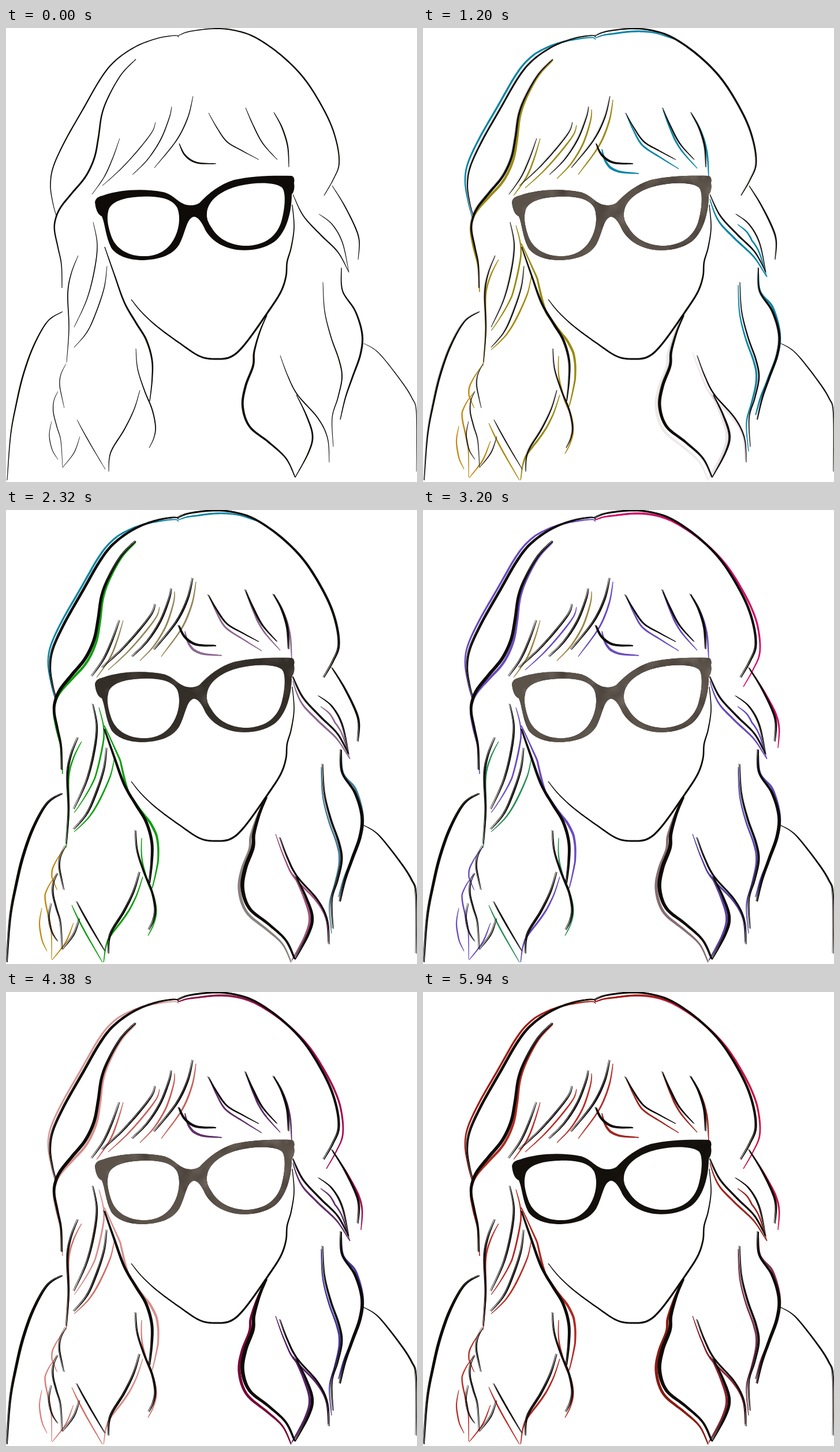
Animation, 712 px wide and 786 px high, one loop 6000 ms. Source, as an HTML page with a canvas:

```html
<!DOCTYPE html>
<html lang="en">
<head>
<meta charset="utf-8">
<title>Line portrait</title>
<style>
  html, body { margin: 0; width: 100%; height: 100%; overflow: hidden; background: #fff; }
  canvas { display: block; }
</style>
</head>
<body>
<canvas id="stage" width="712" height="786"></canvas>
<script>
const ctx = document.getElementById('stage').getContext('2d');
const LOOP = 6000, INK = '#0e0b08';

// Echo colour of each group from a given state on; none before the first.
const echoes = {
  side:   { 1: '0a86a8', 6: '6a4bc0', 8: 'd99a98', 10: '4a3a90', 12: 'a41c12' },
  crown:  { 1: '0a86a8', 6: 'd01068', 8: '8c1a48', 10: '5a3a90', 12: 'a41c12' },
  lock:   { 2: '9a8a10', 4: '10a010', 6: '6a4bc0', 8: 'd8908c', 10: '6a4a90', 12: 'b02a22' },
  wisp:   { 2: 'a88a12', 4: '10a010', 6: '2c9058', 8: 'd07068', 10: '7a5a98', 12: 'b83028' },
  fringe: { 2: '9a8a18', 4: '948458', 6: '6a4bc0', 8: 'c8605a', 10: '74589a', 12: 'b83028' },
  bang:   { 2: '9a8a18', 4: '948458', 6: '9c8440', 8: 'c8605a', 10: '74589a', 12: 'b83028' },
  part:   { 1: '0a86a8', 4: '8c6890', 6: '6a4bc0', 8: '60306a', 10: '44389a', 12: 'a02820' },
  long:   { 1: '0a86a8', 4: '4a7c98', 6: '5c4cb8', 8: '4838a0', 10: '4034a0', 12: '803050' },
  outer:  { 6: 'd01068', 8: 'a80c50', 10: 'c0187a', 12: 'cc1444' },
  curl:   { 3: '8a8280', 7: '780838', 10: '3c2c84', 12: '8a1c12' },
  tail:   { 3: 'a0507c', 6: '5a48b0', 7: '58206a', 10: '40349a', 12: '8a2030' },
  tip:    { 2: 'c08a14', 6: '6a4bc0', 8: 'd8807a', 10: '9a6a98', 12: 'b83028' }
};
const weights = { 0: 1, 2: 1.3, 3: 1.5 };
const doubles = { 0: 0, 3: 1 };
const browns = { 0: 0, 1: 1, 4: 0, 5: 1, 12: 0.07 };

// group, ink width, points, echo offsets spread along the line
const strokes = [
  ['outer', 2.6, '297,14 318,6 363,1 400,5 435,18 480,50 520,92 555,150 572,195 577,235 567,262 551,290',
    '0,3 1,6 1,4 5,5 6,4 8,6 6,12 4,16'],
  ['crown', 0, '297,14 318,6 363,1 400,5 440,20', '2,3 0,6 0,4 -2,0'],
  ['side', 2.2, '299,16 293,13 262,18 225,32 190,56 165,86 132,143 102,196 82,240 77,272 81,302 87,325',
    '0,4 -2,3 -6,-3 -5,-3 -5,-4 -4,-6 -2,2'],
  ['lock', 3, '225,54 200,80 178,118 166,150 160,190 153,225 138,257 115,285 95,310 86,330 84,350 90,380 96,410 97,450',
    '0,2 2,2 3,4 3,5 0,2 -2,3 1,7'],
  ['lock', 3.2, '171,379 187,425 205,475 225,510 243,540 253,575 253,610 249,646',
    '-1,-6 8,0 2,5 6,5 10,0 10,5 4,9'],
  ['lock', 1.7, '151,336 158,375 153,420 140,470 118,518', '10,6 12,5 9,10 0,6'],
  ['wisp', 1.7, '175,412 170,450 155,495 140,527 118,553', '13,18 10,8 5,5 0,4'],
  ['wisp', 1.8, '125,394 113,425 107,460 109,520 105,579', '6,7 3,4 0,2 -1,6'],
  ['tip', 1.3, '104,581 95,600 93,618 97,640 101,658', '0,2 -10,8 -16,3 -12,0'],
  ['tip', 1.4, '90,629 83,645 82,665 88,690 95,715 98,761', '0,0 -14,8 -15,12 -19,17'],
  ['tip', 1.2, '79,681 75,705 80,730 90,747', '-17,8 -17,13 -19,17'],
  ['tip', 1.2, '128,707 118,735 98,761', '-11,8 -18,18'],
  ['wisp', 1.4, '123,678 133,697 150,727 172,764', '-9,6 -8,12 -5,19'],
  ['lock', 2, '232,627 222,660 205,695 185,727 179,745 178,768', '5,8 3,8 -4,8 -9,15'],
  ['wisp', 2, '225,555 228,590 240,628 253,660 259,690 256,710 248,727', '10,13 5,15 1,5 -2,10'],
  ['fringe', 1.8, '324,118 315,155 295,195 257,242', '5,6 8,9 12,12'],
  ['bang', 1.7, '287,136 283,155 268,193 245,228 219,254', '5,5 9,8 13,7'],
  ['fringe', 1.5, '259,163 253,180 230,210 200,243 167,273', '7,5 8,5 10,4'],
  ['bang', 1.5, '197,191 185,225 170,258 149,288', '6,0 8,2 8,2'],
  ['part', 1.8, '351,147 365,172 383,197 410,213 438,228', '2,4 -3,6 5,16'],
  ['part', 1.8, '415,138 428,168 445,200 470,228', '1,4 0,8 5,15'],
  ['part', 2.3, '464,146 478,172 488,205 490,241', '2,4 3,6 5,16'],
  ['part', 3, '300,200 310,220 330,233 364,235', '10,10 6,14 10,17'],
  ['outer', 2.1, '565,273 585,305 605,345 612,370 610,401', '2,5 5,5 5,11'],
  ['part', 2.2, '497,288 515,325 545,358 575,388 594,423', '0,8 -6,6 -5,6 2,8'],
  ['part', 1.6, '542,322 565,340 583,372 594,423', '3,18 -5,14 2,8'],
  ['long', 3.2, '581,415 583,455 605,490 617,530 614,565 600,605 588,640 579,678', '0,8 3,-3 0,2 -3,4 -3,-8'],
  ['long', 2, '549,440 552,490 563,535 577,575 582,605 575,640 565,675 567,725', '-3,5 -4,3 -4,2 -6,10 -3,8'],
  ['curl', 4, '452,497 440,525 430,560 428,585 415,620 410,655 422,690 455,717 485,745 501,778',
    '-2,3 -6,3 -6,2 -5,8 -7,5'],
  ['tail', 1.9, '475,567 488,602 505,635 540,675 557,710 560,752', '-8,-6 -5,3 -3,0 -2,-4'],
  ['tail', 2.8, '503,635 520,670 531,705 524,735 501,778', '-5,-4 -5,0 -6,2'],
  ['body', 2.6, '98,491 72,508 48,550 30,600 18,650 8,705 2,783'],
  ['body', 1.6, '620,546 645,562 680,605 703,640 711,668 711,768'],
  ['face', 3.2, '217,470 235,492 262,517 300,545 335,568 362,573 390,569 415,546 455,490 476,457 485,430 487,405 494,380 499,345 496,306']
].map(([group, width, line, shift]) => {
  const points = spline(pairs(line));
  return { group, width, points, echo: shift && shifted(points, pairs(shift)) };
});

const glasses = new Path2D(
  'M154,301Q156,292 168,290C200,279 240,278 272,284C290,288 297,302 312,306Q325,309 335,303' +
  'C352,285 370,271 395,263C425,256 465,255 495,256Q501,258 499,268Q501,282 495,288' +
  'C495,320 485,355 465,370C445,384 420,386 400,384C370,380 350,362 343,345Q333,325 324,327' +
  'C312,332 311,355 300,375C288,395 262,401 238,402C210,402 190,393 182,380C172,360 172,340 166,326Q156,322 154,301Z' +
  'M177,318C180,300 205,293 235,292C262,291 288,294 297,312C303,328 300,350 290,367' +
  'C278,388 258,396 236,395C208,394 190,380 183,362C177,345 174,330 177,318Z' +
  'M348,320C350,297 375,280 405,273C430,267 465,266 478,276C486,285 483,315 477,335' +
  'C470,358 452,375 420,377C390,378 368,365 357,347Q346,332 348,320Z');

let seed = 7;
const random = () => (seed = seed * 16807 % 2147483647) / 2147483647;
const blots = Array.from({ length: 130 }, () => {
  const x = 150 + random() * 352, y = 250 + random() * 155, r = 5 + random() * 14;
  const fill = ctx.createRadialGradient(x, y, 0, x, y, r);
  const tone = random() < 0.5 ? '128,118,110' : '50,43,38';
  fill.addColorStop(0, `rgba(${tone},.35)`);
  fill.addColorStop(1, `rgba(${tone},0)`);
  return { x, y, r, fill };
});

function pairs(text) {
  return text.split(' ').map(p => p.split(',').map(Number));
}

// Catmull-Rom curve through the points
function spline(p) {
  const out = [], n = p.length - 1;
  for (let i = 0; i < n; i++) {
    const a = p[Math.max(i - 1, 0)], b = p[i], c = p[i + 1], d = p[Math.min(i + 2, n)];
    for (let s = 0; s < 10; s++) {
      const u = s / 10;
      out.push([0, 1].map(k => b[k] + u / 2 * (c[k] - a[k] +
        u * (2 * a[k] - 5 * b[k] + 4 * c[k] - d[k] + u * (3 * (b[k] - c[k]) + d[k] - a[k])))));
    }
  }
  return [...out, p[n]];
}

function shifted(points, offsets) {
  return points.map((p, i) => {
    const f = i / (points.length - 1) * (offsets.length - 1);
    const j = Math.min(Math.floor(f), offsets.length - 2);
    return p.map((v, k) => v + offsets[j][k] + (f - j) * (offsets[j + 1][k] - offsets[j][k]));
  });
}

// Fill a line that thins out at both ends.
function brush(points, width, color, dx = 0, dy = 0) {
  const left = [], right = [], n = points.length - 1;
  points.forEach(([x, y], i) => {
    const a = points[Math.max(i - 1, 0)], b = points[Math.min(i + 1, n)];
    const tx = b[0] - a[0], ty = b[1] - a[1];
    const h = width * (0.4 + 0.6 * Math.sin(Math.PI * i / n)) / 2 / (Math.hypot(tx, ty) || 1);
    left.push([x + dx - ty * h, y + dy + tx * h]);
    right.unshift([x + dx + ty * h, y + dy - tx * h]);
  });
  ctx.beginPath();
  [...left, ...right].forEach(p => ctx.lineTo(...p));
  ctx.fillStyle = color;
  ctx.fill();
}

function held(keys, state) {
  while (state >= 0 && !(state in keys)) state--;
  return keys[state];
}

function blend(keys, state, p) {
  const a = held(keys, state), b = held(keys, state + 1);
  return a + (b - a) * p;
}

function blendColor(keys, state, p) {
  const a = held(keys, state), b = held(keys, state + 1);
  if (!b) return null;
  const rgb = hex => [0, 2, 4].map(i => parseInt(hex.slice(i, i + 2), 16));
  const from = rgb(a || b), to = rgb(b);
  return `rgba(${from.map((v, i) => Math.round(v + (to[i] - v) * p))},${a ? 1 : p})`;
}

function draw(t) {
  // A stepped fade every half second, with a short hold after it
  const state = Math.max(0, Math.floor((t - 200) / 500));
  const start = state ? 200 + 500 * state : 260;
  const steps = state % 11 ? 6 : 5;
  const p = Math.min(1, Math.max(0, (Math.floor((t - start) / 60) + 1) / steps));

  ctx.fillStyle = '#fff';
  ctx.fillRect(0, 0, 712, 786);

  for (const s of strokes) {
    const color = s.echo && blendColor(echoes[s.group], state, p);
    if (color) brush(s.echo, (s.width || 2) + 1.2, color);
  }

  const weight = blend(weights, state, p), double = blend(doubles, state, p);
  for (const s of strokes) {
    if (!s.width) continue;
    const hair = s.group !== 'face';
    if (hair && double) {
      ctx.globalAlpha = double;
      brush(s.points, s.width * 0.8, INK, -2, -1);
      ctx.globalAlpha = 1;
    }
    brush(s.points, s.width * (hair ? weight : 1), INK);
  }

  ctx.fillStyle = INK;
  ctx.fill(glasses, 'evenodd');
  ctx.save();
  ctx.clip(glasses, 'evenodd');
  ctx.globalAlpha = blend(browns, state, p);
  ctx.fillStyle = '#5b524a';
  ctx.fillRect(150, 250, 355, 156);
  for (const b of blots) {
    ctx.fillStyle = b.fill;
    ctx.fillRect(b.x - b.r, b.y - b.r, 2 * b.r, 2 * b.r);
  }
  ctx.restore();
}

const begin = performance.now();
function tick() {
  draw((performance.now() - begin) % LOOP);
  requestAnimationFrame(tick);
}
tick();
</script>
</body>
</html>
```
